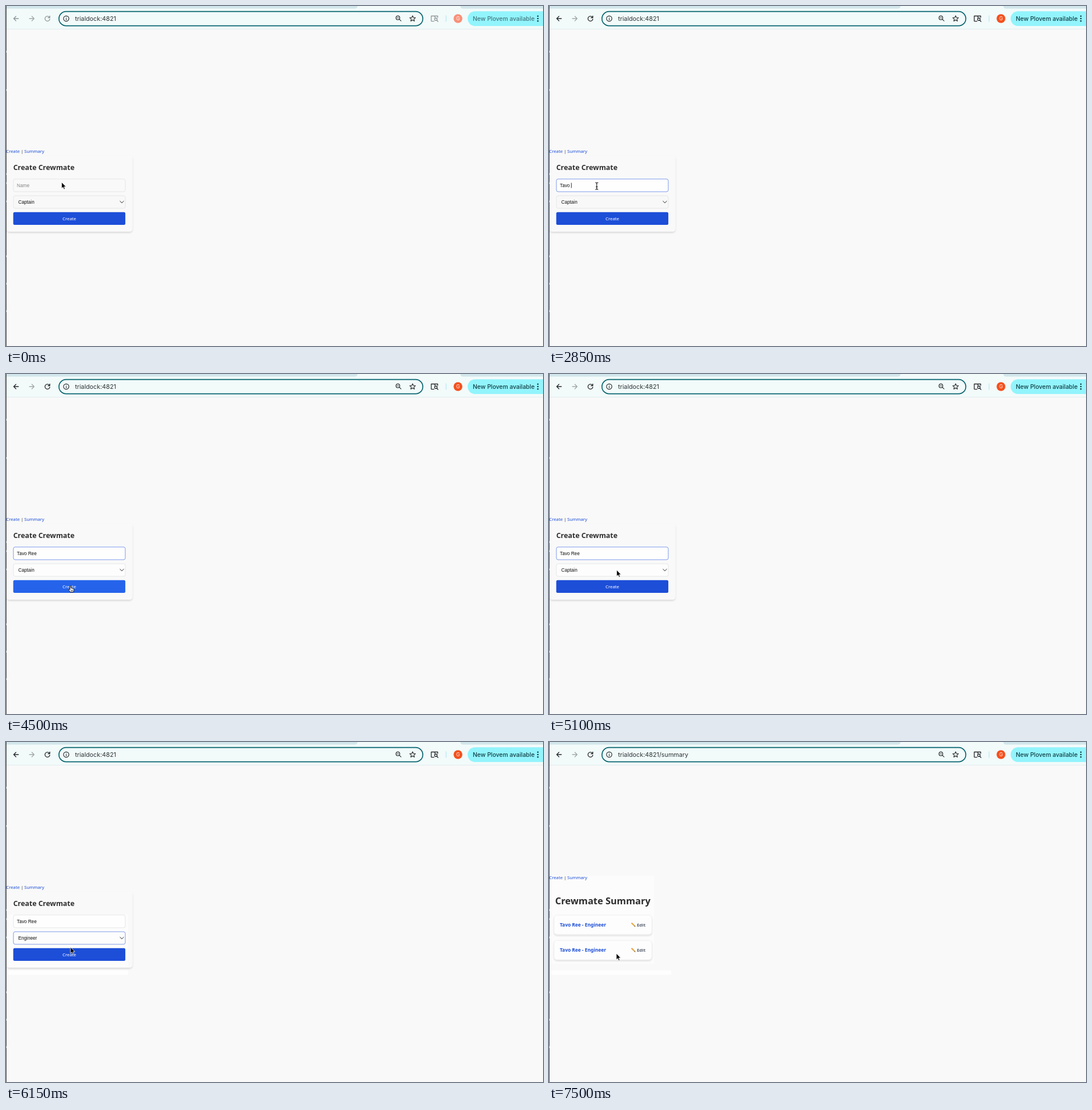
An HTML page that plays this animation: 941 by 595 pixels, repeating every 8000 ms.

```html
<!DOCTYPE html>
<html lang="en">
<head>
<meta charset="utf-8">
<title>Crewmate form</title>
<style>
  html, body { margin: 0; width: 100%; height: 100%; overflow: hidden; background: #f9f9f9; }
  svg { display: block; }
  text { white-space: pre; }
  .page { font-family: "Noto Sans", "Open Sans", sans-serif; }
  .field { font-family: "Liberation Sans", Arial, sans-serif; font-size: 8.2px; }
  .ui { font-family: Inter, Roboto, sans-serif; }
  .line { fill: none; stroke-linecap: round; stroke-linejoin: round; }
</style>
</head>
<body>
<svg width="941" height="595" viewBox="0 0 941 595">
  <defs>
    <filter id="soft" x="-10%" y="-20%" width="120%" height="150%">
      <feDropShadow dx="0" dy="1.8" stdDeviation="1.6" flood-opacity=".14"/>
    </filter>
    <filter id="float" x="-10%" y="-20%" width="120%" height="150%">
      <feDropShadow dx="0" dy="2" stdDeviation="2.5" flood-opacity=".34"/>
    </filter>
    <linearGradient id="glass" x1="0" y1="0" x2="0" y2="1">
      <stop offset="0" stop-color="#dadddd"/>
      <stop offset=".35" stop-color="#d2d8e0"/>
      <stop offset="1" stop-color="#c3cfe4"/>
    </linearGradient>
    <g id="pencil">
      <path d="M1.200 1.200L6 6" stroke="#eda93c" stroke-width="2.300"/>
      <path d="M.6 .6L1.500 1.500" stroke="#e5a08f" stroke-width="2.300"/>
      <path d="M5.200 6.800L6.800 5.200L7.600 7.600Z" fill="#6b5540"/>
    </g>
  </defs>

  <rect width="941" height="595" fill="#f9f9f9"/>

  <!-- browser bar -->
  <rect width="941" height="40" fill="#f2fafa"/>
  <path d="M0 0H616Q615.500 4.500 611 4.500H0Z M796 0H941V4.500H801Q796.500 4.500 796 0Z" fill="#d2e7eb"/>
  <path d="M0 40.500H941" stroke="#e2ebeb"/>
  <rect x="92.800" y="9.700" width="637.600" height="24.900" rx="12.450" fill="#f2fafa" stroke="#06646d" stroke-width="1.700"/>
  <g class="line" stroke-width="1.300">
    <path class="dim" d="M21.800 22H13.700M17.500 18L13.500 22L17.500 26"/>
    <path d="M41 22H49.200M45.300 18L49.300 22L45.300 26" stroke="#a2a8a8"/>
    <path class="dim" d="M76 19.500A4.300 4.300 0 1 0 76.800 23M76.800 17.500V20.500H73.800"/>
    <g stroke="#24292b" stroke-width="1.150">
      <circle cx="105.500" cy="22" r="4.700"/>
      <path d="M105.500 21.800V24.200M105.500 19.700V19.800"/>
      <circle cx="686.700" cy="20.700" r="3.300"/>
      <path d="M689.200 23.200L692.200 26.200M685.300 20.700H688.100"/>
      <path d="M712.500 17L714 20.300L717.500 20.600L714.800 22.900L715.700 26.500L712.500 24.600L709.300 26.500L710.200 22.900L707.500 20.600L711 20.300Z"/>
    </g>
    <path class="dim" d="M750 26.700H745.700Q745.200 26.700 745.200 26.200V17.500H756.500V20M751.500 17.500V20"/>
    <circle class="dim" cx="753.300" cy="23.200" r="2.200"/>
    <path class="dim" d="M755 25L757 27.200"/>
  </g>
  <path d="M771.200 16.500V27.500" stroke="#a9e6ec"/>
  <circle id="avatar" cx="792" cy="22" r="7.700"/>
  <text class="ui" x="792" y="25" font-size="8.300" fill="#fff" text-anchor="middle">G</text>
  <rect x="809" y="9.200" width="150" height="25.800" rx="12.900" fill="#92f4fc"/>
  <text id="update" class="ui" x="818" y="26" font-size="10.400" font-weight="500">New Plovem available</text>
  <g fill="#12383e">
    <circle cx="932" cy="17.800" r="1.300"/><circle cx="932" cy="22" r="1.300"/><circle cx="932" cy="26.200" r="1.300"/>
  </g>
  <text id="url" class="ui" x="121" y="26" font-size="10.800" fill="#2b3234"></text>

  <!-- edge of the window behind -->
  <path d="M.4 0V595" stroke="#2c2c2c" stroke-width=".9"/>
  <path id="edge" stroke="#a9adb0" stroke-width="1"/>

  <rect id="glow" x="1" y="234" width="183" height="154" fill="#fcfcfc"/>
  <rect id="band" x="1" y="399.500" width="213" height="8" rx="2" fill="#fefefe"/>

  <g id="nav" class="page" font-size="7.750" fill="#1d4ed8">
    <text x=".3" y="256.600">Create</text>
    <text x="26.100" y="256.600" fill="#333">|</text>
    <text x="31.900" y="256.600">Summary</text>
  </g>

  <g id="form">
    <rect x="1" y="262" width="220.500" height="133" rx="5" fill="#f9f9f9" filter="url(#soft)"/>
    <rect id="wash" x="1" y="302" width="213" height="92" fill="#fcfcfc"/>
    <text class="page" x="12.700" y="287" font-size="12.400" font-weight="700" fill="#2e2e2e">Create Crewmate</text>
    <rect id="name" x="13" y="302.800" width="196" height="22.200" rx="3"/>
    <text id="typed" class="field" x="19.100" y="316.800"></text>
    <path id="caret" stroke="#111" stroke-width=".9"/>
    <rect id="role" x="13" y="332" width="196" height="22" rx="3"/>
    <text id="pick" class="field" x="21.500" y="345.800" fill="#111"></text>
    <path class="line" d="M199.800 341.500L203 344.600L206.200 341.500" stroke="#222"/>
    <rect id="button" x="12.700" y="360.700" width="196.400" height="22.300" rx="2.500"/>
    <text class="page" x="111" y="374.900" font-size="7.800" fill="#fff" text-anchor="middle">Create</text>
    <g id="menu" class="ui" font-size="7.700">
      <rect x="7" y="332.800" width="197" height="58" rx="5" fill="url(#glass)" filter="url(#float)"/>
      <rect id="bar" x="11" width="189" height="17" rx="3" fill="#3a8ff7"/>
      <path id="tick" class="line" d="M15.500 345L17.700 347.600L21.300 341.800" stroke-width="1.400"/>
      <text class="item" x="25" y="346.200">Captain</text>
      <text class="item" x="25" y="363.100">Engineer</text>
      <text class="item" x="25" y="380">Pilot</text>
    </g>
  </g>

  <g id="summary" class="page" font-weight="700">
    <text id="title" x="10.700" y="283.800" font-size="16.450" fill="#2e2e2e">Crewmate Summary</text>
    <g id="cards"></g>
  </g>

  <g id="cursor">
    <path class="arrow" d="M0 0V11L2.500 8.700L4.200 12.500L6 11.700L4.400 8H7.700Z" fill="#000" stroke="#fff" stroke-width=".8" stroke-linejoin="round"/>
    <g class="beam line">
      <path d="M-2.200 -6Q0 -6 0 -4.500Q0 -6 2.200 -6M0 -4.500V4.500M-2.200 6Q0 6 0 4.500Q0 6 2.200 6M-1.300 1.500H1.300" stroke="#fff" stroke-width="2"/>
      <path d="M-2.200 -6Q0 -6 0 -4.500Q0 -6 2.200 -6M0 -4.500V4.500M-2.200 6Q0 6 0 4.500Q0 6 2.200 6M-1.300 1.500H1.300" stroke="#111" stroke-width="1.100"/>
    </g>
    <g class="hand" stroke-linejoin="round" stroke-linecap="round">
      <path d="M-1 6V.8Q-.9 -.2 0 -.2Q.9 -.2 1 .8V4Q1.400 3.300 2.200 3.600Q2.800 3.800 2.800 4.400Q3.500 3.800 4.300 4.300Q4.600 4.600 4.600 5Q6.300 4.600 6.300 6.200Q6.300 8.500 5.200 10.800H-.4Q-1 9.300 -2.800 7.400Q-3.700 6.300 -2.900 5.700Q-2.100 5.200 -1 6.300Z" fill="#fff" stroke="#111"/>
      <path d="M1.100 7V9M2.700 7V9M4.300 7V9" stroke="#111" stroke-width=".7"/>
    </g>
  </g>
</svg>

<script>
const LOOP = 8000, STEP = 150;
const HOST = "trialdock:4821", NAME = "Tavo Ree";

// time, cursor kind, x, y
const MOVES = [
  [0, "arrow", 97.4, 308.3], [750, "beam", 97, 314], [1050, "beam", 93, 314],
  [1200, "beam", 87, 315], [1350, "beam", 84.5, 315], [1500, "beam", 83.7, 315],
  [3900, "beam", 86, 328], [4050, "arrow", 92, 341], [4200, "hand", 101, 363],
  [4350, "hand", 108, 373], [4500, "hand", 113, 371], [4650, "arrow", 118, 354],
  [4950, "arrow", 119, 347], [5100, "arrow", 118.6, 343], [5400, "arrow", 116, 351],
  [5550, "arrow", 112.6, 358.5], [6150, "arrow", 113, 359], [6300, "hand", 114, 363],
  [6450, "hand", 116, 368], [6600, "hand", 118, 370.5], [6750, "hand", 119.5, 371],
  [7200, "arrow", 118, 370]
];

const $ = id => document.getElementById(id);
const all = css => [...document.querySelectorAll(css)];
const set = (el, attrs) => { for (const k in attrs) el.setAttribute(k, attrs[k]); };
const show = (el, on) => set(el, { display: on ? "inline" : "none" });
const within = (t, a, b) => t >= a && t < b;

$("edge").setAttribute("d", [80, 147, 294, 310, 342, 438, 486, 534]
  .map(y => `M.5 ${y - 1.5}v3`).join(""));

$("cards").innerHTML = [0, 44.2].map(y => `
  <g transform="translate(0 ${y})">
    <rect x="9" y="303" width="171" height="33.8" rx="5" fill="#fdfdfd" stroke="#ececec" stroke-width=".7" filter="url(#soft)"/>
    <text x="18.900" y="322.800" font-size="8.400" fill="#1d4ed8">${NAME} - Engineer</text>
    <use href="#pencil" x="144" y="316"/>
    <text x="154" y="322.800" font-size="7.800" fill="#565d6b">Edit</text>
  </g>`).join("");

function typedCount(t) {
  if (t < 2250) return 0;
  const first = Math.min(5, 1 + Math.floor((t - 2250) / STEP));
  return t < 3300 ? first : Math.min(8, 6 + Math.floor((t - 3300) / STEP));
}

function drawForm(t, kind) {
  const focus = within(t, 1350, 5250), open = within(t, 5250, 6150);
  const count = typedCount(t), blue = "#7f9bea", grey = "#e6e6e6";
  const typed = $("typed");

  set($("name"), { fill: t < 1350 ? "#f9f9f9" : "#fefefe", stroke: focus ? blue : grey });
  typed.textContent = count ? NAME.slice(0, count) : "Name";
  set(typed, { fill: count ? "#111" : "#858585" });

  const caretOn = within(t, 1350, 1800) || within(t, 2250, 4050) || within(t, 4650, 5100);
  show($("caret"), caretOn);
  if (caretOn) {
    const x = 19.6 + (count ? typed.getComputedTextLength() : 0);
    set($("caret"), { d: `M${x} 309.5V318.5` });
  }

  set($("role"), { fill: t < 4050 ? "#f8f8f8" : "#fdfdfd", stroke: t >= 5250 ? blue : grey });
  $("pick").textContent = t < 6150 ? "Captain" : "Engineer";
  set($("button"), { fill: kind === "hand" ? "#2563eb" : "#1d4ed8" });
  show($("wash"), t >= 5250);

  show($("menu"), open);
  const row = t < 5550 ? 0 : 1, lit = !within(t, 6000, 6150);
  show($("bar"), lit);
  set($("bar"), { y: 336 + row * 16.8 });
  all(".item").forEach((el, i) => set(el, { fill: lit && i === row ? "#fff" : "#22272d" }));
  set($("tick"), { stroke: lit && row === 0 ? "#fff" : "#22272d" });
}

function draw(t) {
  const active = t >= 750, done = t >= 7050, loaded = t >= 7500;
  const [, kind, x, y] = MOVES.filter(m => m[0] <= t).pop();

  all(".dim").forEach(el => set(el, { stroke: active ? "#24292b" : "#8f9697" }));
  set($("avatar"), { fill: active ? "#f4511e" : "#f99079" });
  set($("update"), { fill: active ? "#123f46" : "#43777e" });
  $("url").textContent = HOST + (done ? "/summary" : "");

  const shift = done && !loaded ? 44 : 0;
  set($("nav"), { transform: `translate(0 ${done ? shift - 16.5 : 0})` });
  set($("title"), { transform: `translate(0 ${shift})` });
  show($("form"), !done);
  show($("summary"), done);
  show($("cards"), loaded);
  show($("glow"), loaded);
  show($("band"), t >= 5250);
  if (!done) drawForm(t, kind);

  set($("cursor"), { transform: `translate(${x} ${y})` });
  for (const k of ["arrow", "beam", "hand"]) show(document.querySelector("#cursor ." + k), k === kind);
}

const start = performance.now();
function tick() {
  draw((performance.now() - start) % LOOP);
  requestAnimationFrame(tick);
}
tick();
</script>
</body>
</html>
```
